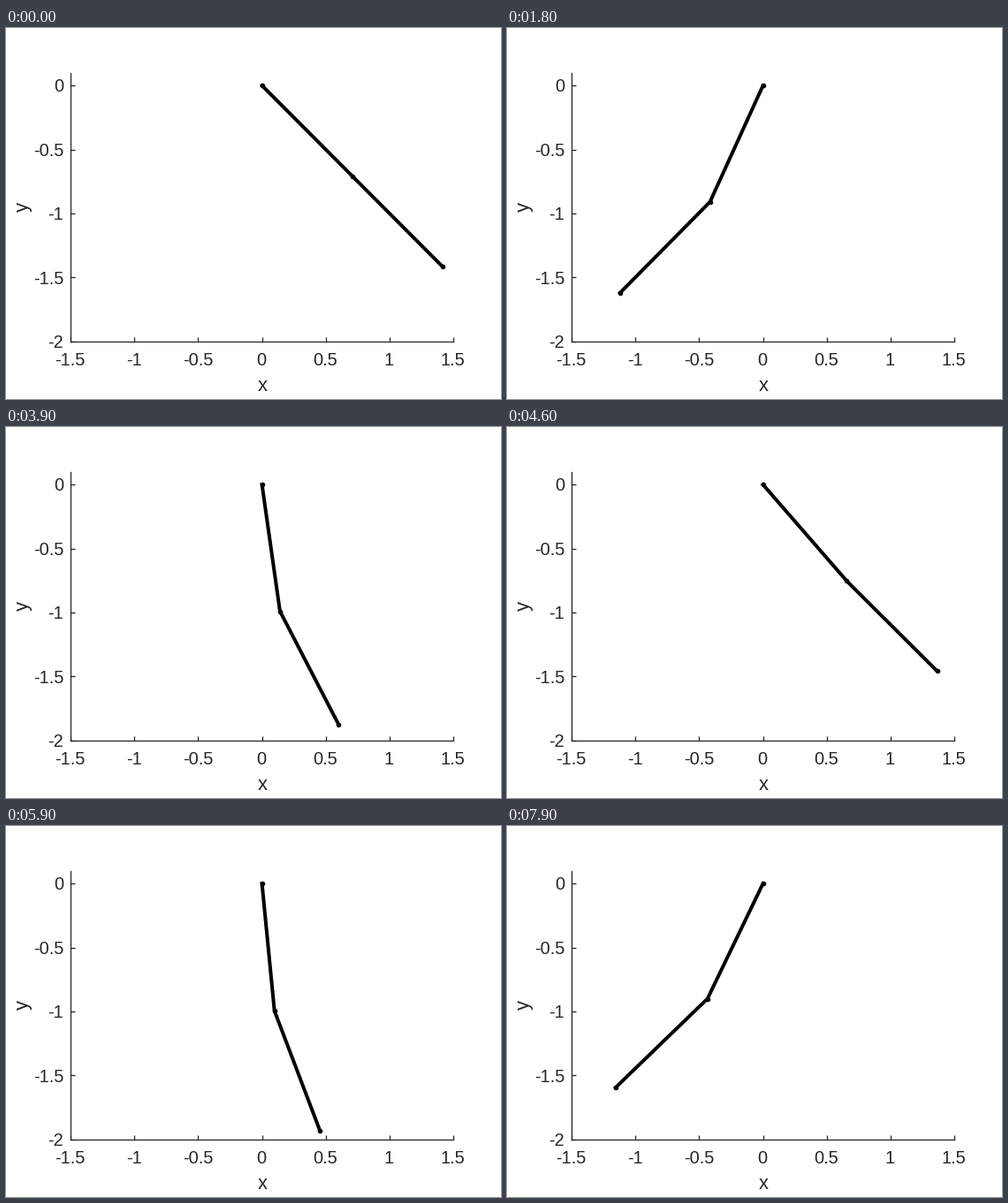
Animation, 560 px wide and 420 px high, one loop 8000 ms. Source, as a matplotlib script:

```python
import numpy as np
import matplotlib.pyplot as plt
from matplotlib.animation import FuncAnimation

W, H, DPI = 560, 420, 100
PX = 72 / DPI                       # one pixel in points
LEFT, RIGHT, TOP, BOTTOM = 73.1, 506.1, 50.7, 354.8
INK = "#262626"
FRAMES, INTERVAL = 80, 100
DT, SUBSTEPS, G = 0.04965, 50, 9.81  # simulated seconds per frame


def rates(state):
    """Double pendulum of two uniform rods, unit mass and length."""
    t1, t2, w1, w2 = state
    c, s = np.cos(t1 - t2), np.sin(t1 - t2)
    mass = np.array([[4 / 3, c / 2], [c / 2, 1 / 3]])
    force = np.array([-s * w2**2 / 2 - 1.5 * G * np.sin(t1),
                      s * w1**2 / 2 - 0.5 * G * np.sin(t2)])
    a1, a2 = np.linalg.solve(mass, force)
    return np.array([w1, w2, a1, a2])


def rk4(state, h):
    k1 = rates(state)
    k2 = rates(state + h / 2 * k1)
    k3 = rates(state + h / 2 * k2)
    k4 = rates(state + h * k3)
    return state + h / 6 * (k1 + 2 * k2 + 2 * k3 + k4)


def simulate():
    state = np.array([np.pi / 4, np.pi / 4, 0.0, 0.0])
    angles = []
    for _ in range(FRAMES):
        angles.append(state[:2])
        for _ in range(SUBSTEPS):
            state = rk4(state, DT / SUBSTEPS)
    return np.array(angles)


angles = simulate()

fig = plt.figure(figsize=(W / DPI, H / DPI), dpi=DPI, facecolor="white")
ax = fig.add_axes([LEFT / W, 1 - BOTTOM / H,
                   (RIGHT - LEFT) / W, (BOTTOM - TOP) / H])
ax.set(xlim=(-1.5, 1.5), ylim=(-2, 0.1))
ax.spines[["top", "right"]].set_visible(False)
for side in ("left", "bottom"):
    ax.spines[side].set(color=INK, linewidth=1.3 * PX)

xticks = np.arange(-1.5, 1.6, 0.5)
yticks = np.arange(-2, 0.1, 0.5)
ax.set_xticks(xticks)
ax.set_yticks(yticks)
ax.tick_params(direction="in", length=5 * PX, width=1.3 * PX, color=INK,
               labelbottom=False, labelleft=False)


def label(x, y, text, size=20, **kw):
    """Text placed in pixels from the top left."""
    kw = {"ha": "center", "va": "baseline", **kw}
    fig.text(x / W, 1 - y / H, text, fontsize=size * PX, color=INK,
             family="Liberation Sans", **kw)


for v in xticks:
    label(LEFT + (v + 1.5) / 3 * (RIGHT - LEFT) - 0.6, 382.3, f"{v:g}")
for v in yticks:
    label(65.2, BOTTOM - (v + 2) / 2.1 * (BOTTOM - TOP) + 7.3, f"{v:g}",
          ha="right")
label(290.5, 411.3, "x", 22)
label(19.3, 202, "y", 22, va="center", rotation=90)

rods, = ax.plot([], [], "o-", color="black", lw=4 * PX, ms=5.6 * PX, mew=0,
                solid_joinstyle="round", clip_on=False, zorder=5)


def update(i):
    t1, t2 = angles[i]
    x = np.cumsum([0, np.sin(t1), np.sin(t2)])
    y = -np.cumsum([0, np.cos(t1), np.cos(t2)])
    rods.set_data(x, y)
    return rods,


anim = FuncAnimation(fig, update, frames=FRAMES, interval=INTERVAL,
                     repeat=True, repeat_delay=0, blit=False)
plt.show()
```
